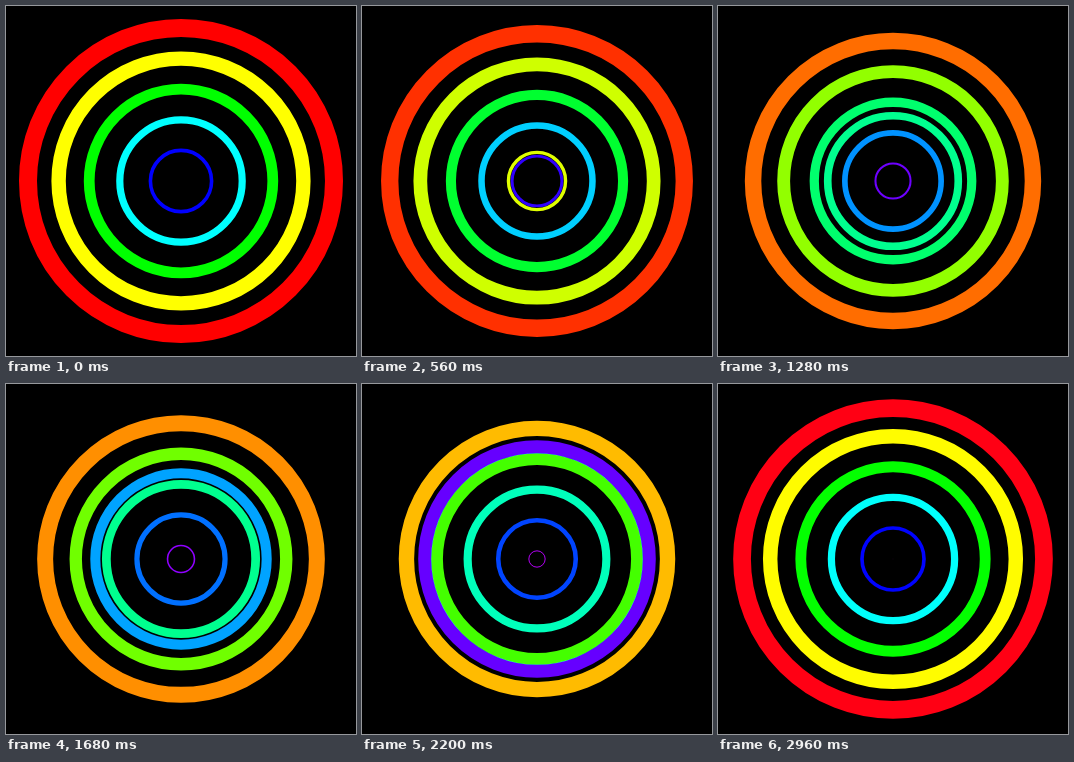
These frames come from a looping animation (350x350 px, 3 s). An HTML page:

```html
<!DOCTYPE html>
<html lang="en">
<head>
<meta charset="utf-8">
<title>Crossing rings</title>
<style>
  html, body { margin: 0; width: 100%; height: 100%; overflow: hidden; background: #000; }
  svg { display: block; width: 100%; height: 100%; isolation: isolate; }
  circle { fill: none; mix-blend-mode: difference; }
</style>
</head>
<body>
<svg viewBox="0 0 350 350"><rect width="350" height="350"/></svg>
<script>
const LOOP = 3000, STEP = 40;
const MAX_RADIUS = 162, RING_COUNT = 5;
const svg = document.querySelector('svg');

function addRing() {
  const ring = document.createElementNS('http://www.w3.org/2000/svg', 'circle');
  ring.setAttribute('cx', 175);
  ring.setAttribute('cy', 175);
  return svg.appendChild(ring);
}

// Outer edge and thickness both scale with size (0 to 1).
function setRing(ring, size, hue) {
  const outer = MAX_RADIUS * size;
  const width = outer / 9;
  ring.setAttribute('r', outer - width / 2);
  ring.setAttribute('stroke-width', width);
  ring.setAttribute('stroke', `hsl(${hue}, 100%, 50%)`);
}

const shrinking = Array.from({ length: RING_COUNT }, addRing);
const growing = addRing();

function draw(time) {
  const p = Math.floor(time % LOOP / STEP) * STEP / LOOP;
  shrinking.forEach((ring, i) => setRing(ring, 1 - (i + p) / RING_COUNT, 60 * (i + p)));
  setRing(growing, p, 360 * p);
}

function tick() {
  draw(performance.now());
  requestAnimationFrame(tick);
}

draw(0);
requestAnimationFrame(tick);
</script>
</body>
</html>
```
